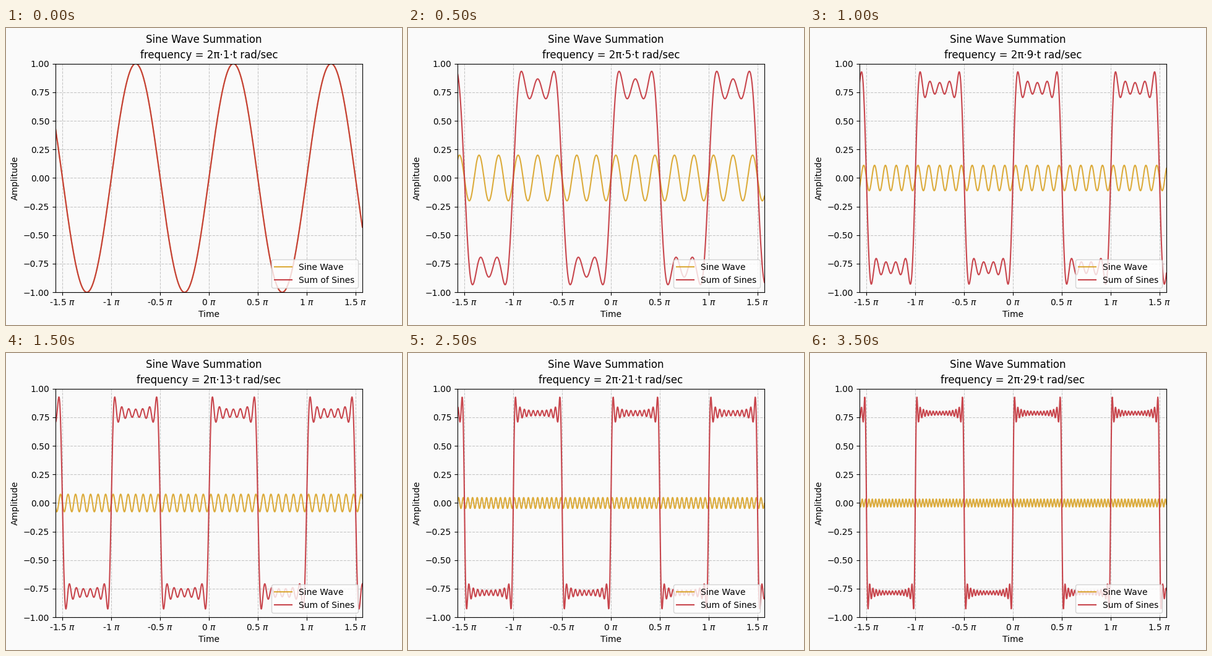
A matplotlib script for the animation above (3.75 s loop, 640 px wide and 480 px high).

```python
import numpy as np
import matplotlib.pyplot as plt
from matplotlib.animation import FuncAnimation

PAPER = "#fafafa"
FRAMES = 15
INTERVAL = 250

t = np.linspace(-np.pi / 2, np.pi / 2, 1000)


def harmonic(k):
    return np.sin(2 * np.pi * k * t) / k


fig, ax = plt.subplots(figsize=(6.4, 4.8), dpi=100, facecolor=PAPER)
ax.set_facecolor(PAPER)
fig.suptitle("Sine Wave Summation")
title = ax.set_title("")
ax.set_xlabel("Time")
ax.set_ylabel("Amplitude")
ax.set_xlim(t[0], t[-1])
ax.set_ylim(-1, 1)
ticks = np.arange(-1.5, 1.6, 0.5)
ax.set_xticks(ticks, [rf"{v:g} $\pi$" for v in ticks])
ax.grid(linestyle="--", alpha=0.7)

wave, = ax.plot([], [], color="#d9a326", alpha=0.9, label="Sine Wave")
total, = ax.plot([], [], color="#c3323a", alpha=0.9, label="Sum of Sines")
ax.legend(loc="lower right")


def update(i):
    k = 2 * i + 1
    wave.set_data(t, harmonic(k))
    total.set_data(t, sum(harmonic(n) for n in range(1, k + 1, 2)))
    title.set_text(f"frequency = 2π·{k}·t rad/sec")
    return wave, total, title


anim = FuncAnimation(fig, update, frames=FRAMES, interval=INTERVAL,
                     init_func=lambda: update(0), repeat=True, repeat_delay=0)
plt.show()
```
